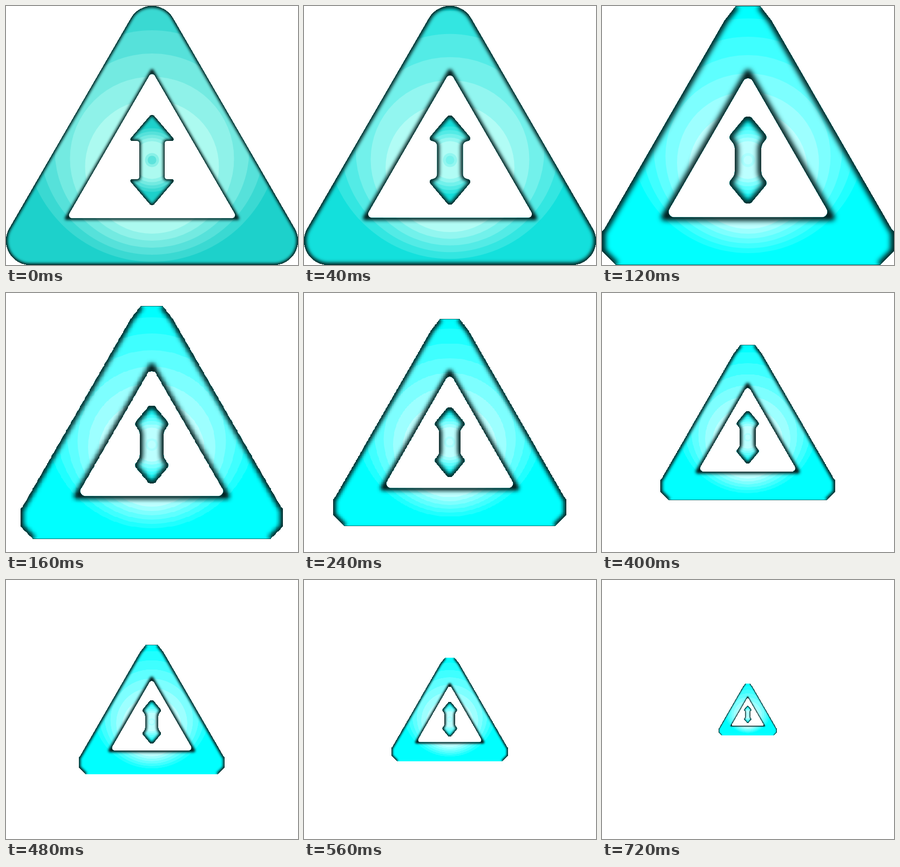
An HTML page with a canvas that plays this animation: 541x480 px, repeating every 0.76 s.

```html
<!DOCTYPE html>
<html lang="en">
<head>
<meta charset="utf-8">
<title>Shrinking triangle</title>
<style>
html, body { margin: 0; width: 100%; height: 100%; overflow: hidden; background: #fff; }
canvas { display: block; }
</style>
</head>
<body>
<canvas id="stage" width="541" height="480"></canvas>
<script>
const W = 541, H = 480, MID = W / 2, ARROW_Y = 285.5;
const STEP = 40, LOOP = 760, MORPH = 3;
const stage = document.getElementById('stage').getContext('2d');

const mix = (a, b, m) => a + (b - a) * m;
const mixAll = (a, b, m) => a.map((v, i) => mix(v, b[i], m));

// t runs from the dark metal to the highlight, m from teal to cyan
function tone(t, m) {
  const dark = mixAll([29, 209, 203], [0, 255, 255], m);
  const light = mixAll([172, 250, 240], [188, 255, 255], m);
  return `rgb(${mixAll(dark, light, t).map(Math.round).join()})`;
}

// Closed outline through [x, y, corner radius] points
function rounded(points) {
  const path = new Path2D(), n = points.length;
  const last = points[n - 1], first = points[0];
  const start = [(last[0] + first[0]) / 2, (last[1] + first[1]) / 2];
  path.moveTo(...start);
  points.forEach(([x, y, r = 0], i) => {
    const [nx, ny] = i < n - 1 ? points[i + 1] : start;
    path.arcTo(x, y, nx, ny, r);
  });
  path.closePath();
  return path;
}

const flipX = ([x, y, r]) => [W - x, y, r];
const flipY = ([x, y, r]) => [x, 2 * ARROW_Y - y, r];

// Completes a right half; points on the axis stay single
function mirror(half) {
  return half.concat(half.filter(p => p[0] !== MID).reverse().map(flipX));
}

// Shades a shape with evenly stepped rings, given the outer and inner [top, bottom]
function rings(c, outer, inner, m) {
  const n = 5 + Math.round(m);
  c.fillStyle = tone(0, m);
  c.fillRect(0, 0, W, H);
  for (let i = 0; i < n; i++) {
    const [top, bottom] = mixAll(outer, inner, i / (n - 1));
    disc(c, (top + bottom) / 2, (bottom - top) / 2, tone((i + 1) / n, m));
  }
}

function disc(c, y, r, color) {
  c.fillStyle = color;
  c.beginPath();
  c.arc(MID, y, r, 0, 2 * Math.PI);
  c.fill();
}

// Dark inner bevel: a wide blurred line and a thin sharp one
function bevel(c, shape, edges, m) {
  c.strokeStyle = '#001c1c';
  c.lineJoin = 'round';
  c.filter = `blur(${mix(2.4, 5, m)}px)`;
  c.lineWidth = mix(6, 13, m);
  c.stroke(edges);
  c.filter = 'none';
  c.globalAlpha = .6;
  c.lineWidth = 2;
  c.stroke(shape);
}

function drawFrame(c, m) {
  const apex = [MID, mix(120, 124, m)], foot = [mix(429, 425, m), mix(393.5, 391.5, m)];
  const r = mix(6, 10, m);
  const hole = rounded(mirror([[...apex, r], [...foot, r]]));

  const shape = new Path2D(), edges = new Path2D();
  if (m < .5) {
    const outline = rounded(mirror([[MID, -45, 45], [574, H, 45]]));
    shape.addPath(outline);
    edges.addPath(outline);
  } else {
    // Corners cut off; the flat top and bottom get no bevel
    const cut = [[293, 0], [314, 27], [537, 414], [W, 418], [W, 454], [515, H]];
    shape.addPath(rounded(mirror(cut)));
    for (const side of [cut, cut.map(flipX)]) {
      side.forEach(([x, y], i) => i ? edges.lineTo(x, y) : edges.moveTo(x, y));
    }
  }
  shape.addPath(hole);
  edges.addPath(rounded(mirror([apex, foot])));

  c.save();
  c.clip(shape, 'evenodd');
  rings(c, mixAll([2, 474], [23, 458], m), mixAll([174, 422], [193, 413], m), m);
  bevel(c, shape, edges, m);
  c.restore();
}

function drawArrow(c, m) {
  const top = [MID, 199, mix(5, 10, m)];
  const tip = [mix(314, 307, m), mix(250, 243, m), mix(3, 8, m)];
  const neck = [mix(294, 295, m), mix(250, 258, m), mix(4, 20, m)];
  const half = [top, tip, neck];
  const shape = rounded(mirror(half.concat(half.map(flipY).reverse())));
  const span = r => [ARROW_Y - r, ARROW_Y + r];

  c.save();
  c.clip(shape);
  rings(c, span(mix(59, 69, m)), span(35), m);
  disc(c, ARROW_Y, 13, tone(mix(.75, .9, m), m));
  disc(c, ARROW_Y, 8, tone(mix(.45, 1, m), m));
  bevel(c, shape, shape, m);
  c.restore();
}

// Makes every pixel either solid or empty
function harden(c) {
  const image = c.getImageData(0, 0, W, H), px = image.data;
  for (let i = 3; i < px.length; i += 4) px[i] = px[i] > 127 ? 255 : 0;
  c.putImageData(image, 0, 0);
}

// m = 0: crisp with thin shading, m = 1: soft with wide shading
function makeSign(m) {
  const canvas = document.createElement('canvas');
  canvas.width = W;
  canvas.height = H;
  const c = canvas.getContext('2d');
  drawFrame(c, m);
  drawArrow(c, m);
  harden(c);
  return canvas;
}

const signs = Array.from({ length: MORPH + 1 }, (_, i) => makeSign(i / MORPH));
stage.imageSmoothingEnabled = false;

// Soften for a few steps, then shrink by a twentieth each step
function draw(now) {
  const n = Math.floor(now % LOOP / STEP);
  const scale = n > MORPH ? 1.1 - n / 20 : 1;
  const w = Math.floor(W * scale), h = Math.round(H * scale);
  stage.fillStyle = '#fff';
  stage.fillRect(0, 0, W, H);
  stage.drawImage(signs[Math.min(n, MORPH)], Math.floor((W - w) / 2), (H - h) / 2, w, h);
}

function tick() {
  draw(performance.now());
  requestAnimationFrame(tick);
}
tick();
</script>
</body>
</html>
```
